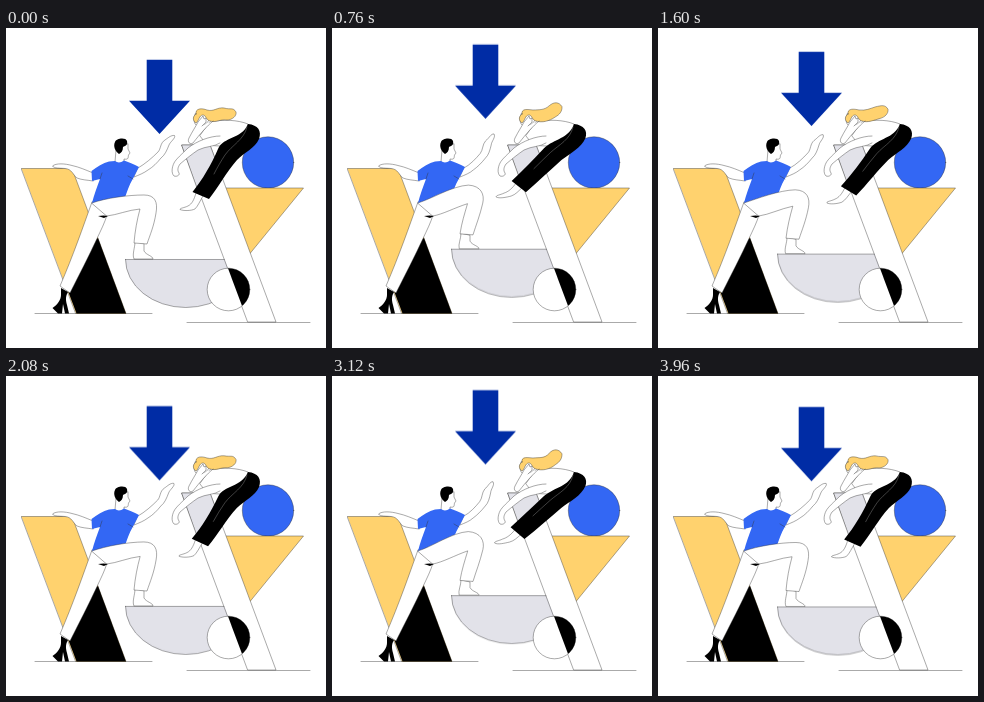
An HTML page for the animation above (4000 ms loop, 320 px wide and 320 px high).

```html
<!DOCTYPE html>
<html lang="en">
<head>
<meta charset="utf-8">
<title>Helping hand</title>
<style>
  html, body { margin: 0; width: 100%; height: 100%; overflow: hidden; background: #fff; }
  svg { display: block; width: 100vw; height: 100vh; }
  .line { fill: #fff; stroke: #333; stroke-width: .42; stroke-linejoin: round; stroke-linecap: round; }
  .open { fill: none; }
  .yellow { fill: #ffd26e; }
  .blue { fill: #3367f4; }
  .gray { fill: #e2e2e9; }
  .black { fill: #000; }
  .arrow { fill: #002ca5; }

  /* Every part goes out for one second and comes back at constant speed. */
  .move { animation: 1s linear infinite alternate; }
  .arrow { animation-name: arrow; }
  .bowl { animation-name: bowl; }
  .thigh { animation-name: thigh; }
  .foot { animation-name: foot; }
  .reach { animation-name: reach; }
  .shade { animation-name: shade; }
  .trousers { animation-name: trousers; }
  .crease { animation-name: crease; stroke: #999; }
  .toes { animation-name: toes; }
  .hair { animation-name: hair; }

  @keyframes arrow { to { transform: translateY(-20px); } }
  @keyframes bowl { to { transform: translateY(-13.5px); } }
  @keyframes thigh {
    from { d: path("M86 175 C100 170 122 167 138 167 C149 167 152 174 150 185 C148 198 144 207 141 216 L128 215 C129 203 131 192 134 181 C122 182 111 187 101 188 Z"); }
    to { d: path("M86 175 C100 171 120 155 136 154 C149 155 153 164 151 172 C148 184 144 194 141 204 L128 203 C130 192 133 184 136 174 C123 179 111 186 101 188 Z"); }
  }
  @keyframes foot {
    from { d: path("M129 214 C129 220 126 226 128 231 L147 231 C147 228 140 227 138 223 L138 216 Z"); }
    to { d: path("M129 203 C129 208 126 213 127 217.5 L147 217.5 C147 215 140 214 138 210 L138 205 Z"); }
  }
  @keyframes reach {
    from { d: path("M132 140 C139 136 146 130 152 124 C155 121 154 115 159 112 C162 110 165 107 168.500 107.500 C170 110 164 114 163 117 C161 122 159 127 155 130 C151 135 147 139 142 142 C138 145 133 147 128 149 Z"); }
    to { d: path("M132 140 C138 137 143 131 147 126 C150 122 149 117 152 113 C155 111 157 105 160 105.500 C162 109 158 113 158 117 C157 122 156 127 153 130 C149 135 145 139 141 142 C138 145 133 147 128 149 Z"); }
  }
  @keyframes shade {
    from { d: path("M176 117 L204 117 L213 141 L191 159 Z"); }
    to { d: path("M176 117 L204 117 L210 132 L186 145 Z"); }
  }
  @keyframes trousers {
    from { d: path("M242 96 C252 97 256 103 253 111 C249 120 239 124 231 132 C221 143 212 160 203 171 L186.500 164 C197 151 205 137 212 121 C218 108 235 112 242 96 Z"); }
    to { d: path("M242 96 C252 97 256 103 253.500 110 C249 120 239 125 229 132 C217 142 204 152 191 162 L177.500 149.500 C189 140 200 130 212 120 C224 111 237 111 242 96 Z"); }
  }
  @keyframes crease {
    from { d: path("M241 99 C238 112 226 117 219 127 C215 133 211 140 208 146"); }
    to { d: path("M241 99 C238 112 228 116 218 124 C212 129 206 134 200 139"); }
  }
  @keyframes toes {
    from { d: path("M190 165 C188 172 186 176 182 178 C178 180 174 180 174 181.500 C177 183 185 183 189 181 C192 178 194 173 197 168 Z"); }
    to { d: path("M182 152 C178 157 173 160 169 161 C165 163 161 163 161 165 C164 167 171 165 176 164 C181 163 184 160 188 157 Z"); }
  }
  @keyframes hair {
    from { d: path("M190 86 C189 80 196 80 201 82 C208 84 211 79 218 80 C225 82 227 79 230 84 C231 88 226 92 221 92 C214 91 210 95 204 93 C200 92 200 87 197 87 C193 87 193 93 190 95 C186 92 187 88 190 86 Z"); }
    to { d: path("M190 86 C189 80 196 82 201 82 C208 81 213 83 217 77 C221 71 227 72 230 77 C230 82 228 85 224 88 C218 94 210 95 204 93 C200 92 200 87 197 87 C193 87 193 93 190 95 C186 92 187 88 190 86 Z"); }
  }
</style>
</head>
<body>
<svg viewBox="0 0 320 320">
  <defs>
    <clipPath id="inBeam"><path d="M176 117 H204 L270 294 H242 Z"/></clipPath>
  </defs>

  <!-- blocks -->
  <path class="line gray bowl move" d="M119.500 231.500 H240 A60.250 48 0 0 1 119.500 231.500 Z"/>
  <circle class="line blue" cx="262" cy="134.500" r="25.700"/>
  <path class="line yellow" d="M218 160 H297.500 L244 225.500 Z"/>
  <path class="line" d="M176 117 H204 L270 294 H242 Z"/>
  <path class="line gray shade move"/>
  <circle class="line" cx="222.500" cy="261.500" r="21.300"/>
  <circle class="black" cx="222.500" cy="261.500" r="21.300" clip-path="url(#inBeam)"/>
  <path class="line open" d="M29 285.500 H146 M181 294.500 H304"/>
  <path class="line yellow" d="M15.500 140.500 H66 L120 285.500 H70 Z"/>
  <path class="black" d="M92 210 L120 285.500 H70.500 L62 263 L82 215 Z"/>

  <!-- woman -->
  <path class="line toes move"/>
  <path class="line" d="M204 94 C217 91 232 92 242 96 C243 104 238 111 232 116 C222 119 210 118 201 117 L194 108 Z"/>
  <path class="black trousers move"/>
  <path class="line open crease move"/>
  <path class="line" d="M214 108 C204 108 191 113 182 120 C176 126 170 131 168 135 C166 139 165 145 168 148 C171 149 174 147 173 145 C171 142 172 139 174 136 C180 131 186 126 192 122 C200 118 208 119 214 115"/>
  <path class="line" d="M189 86 C187 91 188 95 190 97 C194 100 200 97 203 92 L201 85 Z"/>
  <path class="line yellow hair move"/>
  <path class="line" d="M207 93 C201 98 194 106 187 115 C184 117 181 114 183 110 C186 104 190 98 192 94 L197 88 L198 91 L200 90 L200 94 L196 98"/>

  <!-- man -->
  <path class="line" d="M87 145 C80 142 73 139 66 137.500 C59 135.500 50 135 46.500 138 C48 140.500 54 140 59 140.500 C66 141 67 147 71 150 C76 152 81 152 87 153 Z"/>
  <path class="black" d="M55 260 L62 264 C59 269 60 273 61 277 L63 285.500 H59 L57 276 L56 285.500 H52 L46.500 280 C51 277 55 272 55 267 Z"/>
  <path class="line" d="M86 174 C77 199 67 228 54 258 L64 265 C73 247 83 228 91 210.500 C95 202 99 194 101 187 L119 176 Z"/>
  <path class="line reach move"/>
  <path class="line" d="M110 122 L109 134 Q113 138 118 134 L118 131 C123 132 122 129 122.500 127 L124 125 L122 121 V116 Z"/>
  <path class="blue" d="M103 133.500 C97 135 91 139 85.500 143 L86 153 L94 151 C91 159 88 167 86 175 C96 179 108 178 118 172 C121 164 123 157 127 150.500 L133 139 C128 136 122 134 118 132.500 Q113 136 109 133 Z"/>
  <path class="line open" d="M94 151 L96 145 M127 151 L122 148"/>
  <path class="line foot move"/>
  <path class="line thigh move"/>
  <path d="M92 188 Q98 187 102 188 L98 190 Z"/>
  <path class="black" d="M113 126 C109 123 107 118 109 114 C110 110 120 109 121 113 C122 117 119 118 117 119 C117 123 115 125 113 126 Z"/>

  <path class="arrow move" d="M140.700 31.700 H166.300 V72.700 H184 L153.500 106 L123 72.700 H140.700 Z"/>
</svg>
</body>
</html>
```
